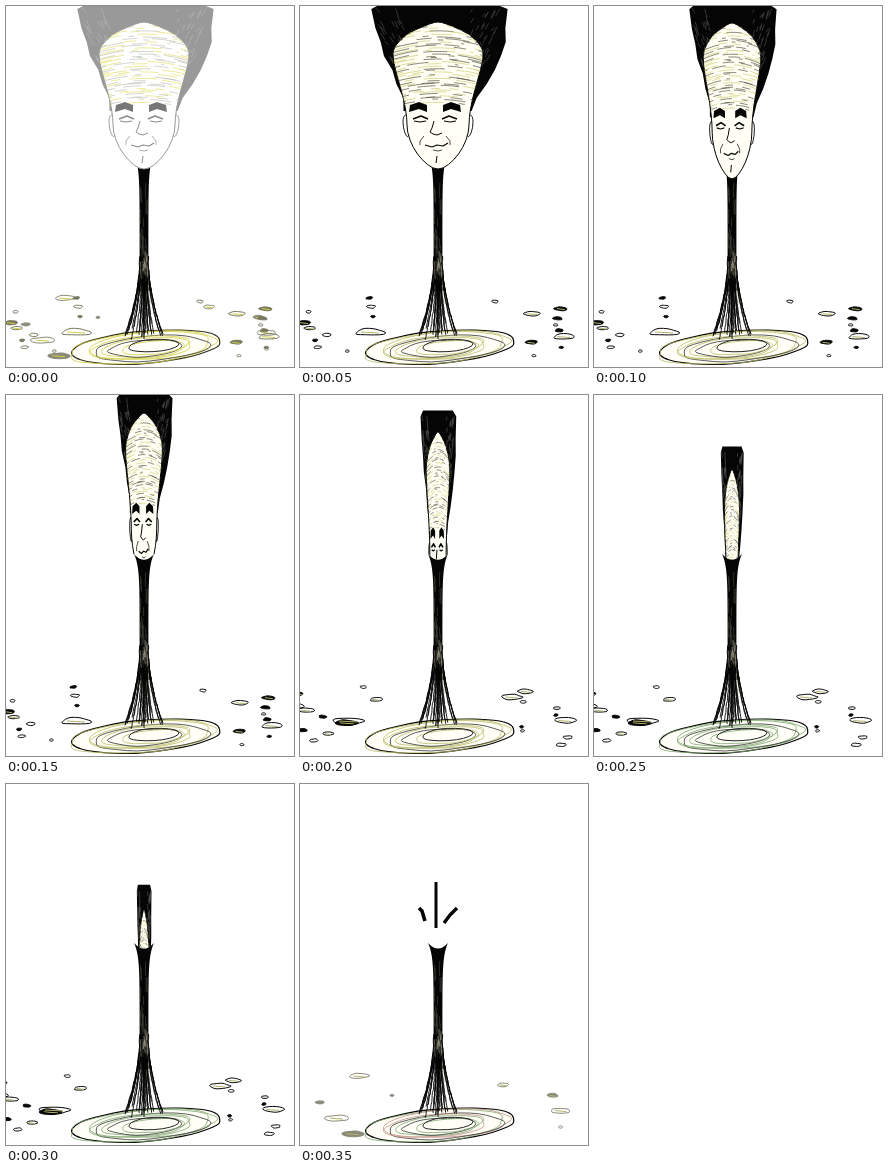
Animation of 288 by 361 pixels, one loop 500 ms. Source, as an HTML page with a canvas:

```html
<!DOCTYPE html>
<html lang="en">
<head>
<meta charset="utf-8">
<title>Swallowed</title>
<style>
html, body { margin: 0; width: 100%; height: 100%; overflow: hidden; background: #fff; }
canvas { display: block; width: 100vw; height: 100vh; }
</style>
</head>
<body>
<canvas id="stage" width="288" height="361"></canvas>
<script>
const ctx = document.getElementById('stage').getContext('2d');
const STEP = 50, LOOP = 500, LAST = 7, MID = 138;
const INK = '#050505', GREY = '#999';

let seed = 1;
function rnd() {
  seed = (seed * 16807) % 2147483647;
  return seed / 2147483647;
}
const spread = r => (rnd() * 2 - 1) * r;

function stroke(color, width = 1) {
  ctx.strokeStyle = color;
  ctx.lineWidth = width;
  ctx.stroke();
}
function fill(color) {
  ctx.fillStyle = color;
  ctx.fill();
}
function poly(p) {
  ctx.beginPath();
  p.forEach(q => ctx.lineTo(...q));
}
function line(p, color, width) {
  poly(p);
  stroke(color, width);
}
// Closed smooth path through the middles of the edges
function blob(p) {
  const n = p.length, mid = i => [0, 1].map(j => (p[i % n][j] + p[(i + 1) % n][j]) / 2);
  ctx.beginPath();
  ctx.moveTo(...mid(n - 1));
  for (let i = 0; i < n; i++) ctx.quadraticCurveTo(...p[i], ...mid(i));
  ctx.closePath();
}
function ring(x, y, rx, ry, tilt, wobble, n) {
  const p = [];
  for (let i = 0; i < n; i++) {
    const a = i / n * Math.PI * 2, r = 1.03 + spread(wobble);
    const u = Math.cos(a) * rx * r, v = Math.sin(a) * ry * r;
    p.push([x + u, y + v - u * tilt]);
  }
  blob(p);
}
// Points [half width, y] on the left, then their mirror on the right
const mirror = p => [...p.map(([u, y]) => [-u, y]), ...p.slice().reverse()];

function drop(x, y, w, ink, accent, full) {
  ring(x, y, w / 2, .8 + w * .09, 0, .25, 10);
  if (full) fill(ink);
  stroke(ink, 1);
  if (w > 10) line([[x - w * .3, y], [x + w * .3, y + 1]], accent);
}

function scatter(start, count, ink, accent, drift) {
  seed = start;
  for (let i = 0; i < count; i++) {
    const side = i % 2 ? 1 : -1, y = 292 + (i + rnd()) / count * 58;
    const near = y > 316 ? 82 : 45, x = near + rnd() * (142 - near);
    const w = 4 + rnd() ** 2 * 20;
    drop(MID + side * (x + drift), y, w, ink, accent, rnd() < .4);
  }
}

function floor(k) {
  const accent = k ? '#b4b46a' : '#d3cf45';
  if (k % LAST === 0) scatter(512, 9, '#8a8a78', accent, 0);
  if (k === LAST) return;
  const ink = k ? INK : '#77775f';
  scatter(k < 4 ? 2024 : 907, 20, ink, accent, k % 4);
  drop(k < 4 ? 70 : 48, 326, 30, ink, accent);
}

function puddle(k) {
  const accent = k === 0 ? '#d3cf45' : k < 5 ? '#bcbc66' : '#7fa66f';
  const tint = k === LAST ? '#c7948a' : accent;
  seed = 36;
  ring(141, 341, 73, 16, .08, .03, 20);
  fill('#fffff8');
  stroke(k ? INK : '#33331c', 1.2);
  for (let i = 0; i < 7; i++) {
    const s = .95 - i * .09;
    ring(143 + spread(9), 341 + spread(2), 73 * s, 16 * s, .08, .1, 14);
    stroke(i % 3 === 2 ? '#333' : i % 2 ? tint : accent, .8);
  }
  ring(148, 339, 26, 6, .05, .15, 10);
  stroke('#222');
}

function stemHalf(y, sunk) {
  const lip = (sunk ? 6 : 2.5) * Math.exp((158 - y) / 12);
  return 4.4 + lip + 14 * Math.max(0, (y - 255) / 72) ** 1.8;
}
// A strand at place a (-1 to 1) across the stem
function strand(a, from, to, color, width) {
  const p = [];
  for (let y = from; y <= to; y += 3) p.push([MID + a * stemHalf(y) + spread(.35), y]);
  line(p, color, width);
}

function stem(sunk) {
  const edge = [];
  for (let y = 159; y < 286; y += 3) edge.push([stemHalf(y, sunk), y]);
  const sides = mirror(edge).map(([u, y]) => [MID + u, y]);
  poly(sides);
  if (sunk) ctx.quadraticCurveTo(MID, 170, ...sides[0]);
  fill(INK);

  seed = 431;
  for (let i = 0; i < 46; i++) {
    const y = 170 + Math.sqrt(rnd()) * 120;
    strand(spread(.85), y, y + 8 + rnd() * 14, y > 245 ? '#a5a28c' : '#4c4a3e', .6);
  }
  for (let i = 0; i < 30; i++) strand(spread(1), 255 + rnd() * 25, 318 + rnd() * 16, INK, .9);
  for (const a of [-1, 1]) strand(a, 250, 330, INK, 1);
}

function head(k) {
  const age = Math.max(0, k - 1), sunk = k > 2, pale = k === 0;
  const sx = .64 ** age, sy = 1.06 ** age;
  const sink = 54 * Math.max(0, (k - 3) / 2) ** 1.6;
  const map = p => p.map(([u, y]) => [MID + u * sx, y * sy + sink]);
  const ink = pale ? GREY : INK;

  ctx.save();
  if (sunk) {
    poly([[0, 0], [288, 0], [288, 159], [148, 159]]);
    ctx.quadraticCurveTo(MID, 170, 128, 159);
    ctx.lineTo(0, 159);
    ctx.clip();
  }

  const lean = y => 5 * Math.sin(Math.max(0, y) / 105 * Math.PI);
  const hair = mirror([[33, 105], [38, 92], [46, 78], [51, 64], [59, 50], [63, 36], [65, 22], [68, 3], [58, -2]]);
  seed = 91;
  poly(map(hair.map(([u, y]) => [u + lean(y) + spread(1.5), y])));
  fill(ink);
  for (let i = 0; i < 60; i++) {
    const y = 2 + rnd() * 58, u = (i % 2 ? 1 : -1) * (34 + rnd() * (30 - y * .2));
    line(map([[u, y], [u * .93, y + 3 + rnd() * 5]]), pale ? '#bbb' : '#555', .6);
  }

  for (const side of [-1, 1]) {
    blob(map([[30, 108], [35, 110], [35, 122], [31, 132], [28, 128]].map(([u, y]) => [side * u, y])));
    fill('#fff');
    stroke(ink, .9);
  }
  const face = map(mirror([[3, 16], [14, 20], [32, 28], [45, 42], [45, 54], [40, 73], [34, 94],
    [31, 112], [31, 126], [25, 142], [16, 154], [5, 163]]));
  blob(face);
  fill(pale ? '#fff' : '#fffff6');
  stroke(ink, 1);

  // Wrinkles: broken arcs across the forehead
  ctx.save();
  blob(face);
  ctx.clip();
  seed = 209;
  for (let y = 20; y < 97; y += 2) {
    for (let u = -44; u < 44;) {
      const end = u + 5 + rnd() * 24, p = [], shift = spread(1);
      for (let x = u; x <= end; x += 3) p.push([x, y + shift + x * x / 300]);
      const yellow = rnd() < .5;
      const color = yellow ? (pale ? '#e4e06c' : '#d0cc72') : (pale ? '#c2c2b8' : '#55533e');
      line(map(p), color, .7);
      u = end + 3 + rnd() * 16;
    }
  }
  ctx.restore();

  // Features sit a little left of the middle.
  const dark = pale ? '#777' : INK;
  const mark = (p, width = 1) => line(map(p.map(([u, y]) => [u - 3, y])), pale ? '#8d8d8d' : ink, width);
  for (const s of [-1, 1]) {
    poly(map([[8, 106], [8, 99], [16, 96], [25, 99], [26, 106], [16, 103]].map(([u, y]) => [s * u - 3, y])));
    fill(dark);
    mark([[s * 7, 113], [s * 14, 110], [s * 22, 113]], 1.6);
    mark([[s * 9, 115], [s * 15, 116], [s * 21, 115]], 1.2);
    mark([[s * 11, 130], [s * 15, 135], [s * 15, 139]], .7);
  }
  mark([[-1, 115], [-3, 122], [-5, 126], [-2, 128], [2, 129], [7, 127]]);
  mark([[-10, 139], [-3, 141], [2, 139], [8, 140], [13, 137]], 1.2);
  mark([[-2, 144], [3, 145], [7, 144]], .7);
  mark([[2, 150], [1, 157]]);
  ctx.restore();
}

function burst() {
  line([[136, 98], [136, 144]], INK, 3);
  line([[119, 124], [122, 127], [125, 137]], INK, 3.6);
  line([[157, 124], [150, 131], [144, 139]], INK, 3.4);
}

function draw(k) {
  ctx.fillStyle = '#fff';
  ctx.fillRect(0, 0, 288, 361);
  ctx.lineJoin = 'round';
  floor(k);
  puddle(k);
  stem(k > 2);
  if (k < LAST) head(k);
  else burst();
}

const start = performance.now();
function tick() {
  const t = (performance.now() - start) % LOOP;
  draw(Math.min(LAST, Math.floor(t / STEP)));
  requestAnimationFrame(tick);
}
tick();
</script>
</body>
</html>
```
